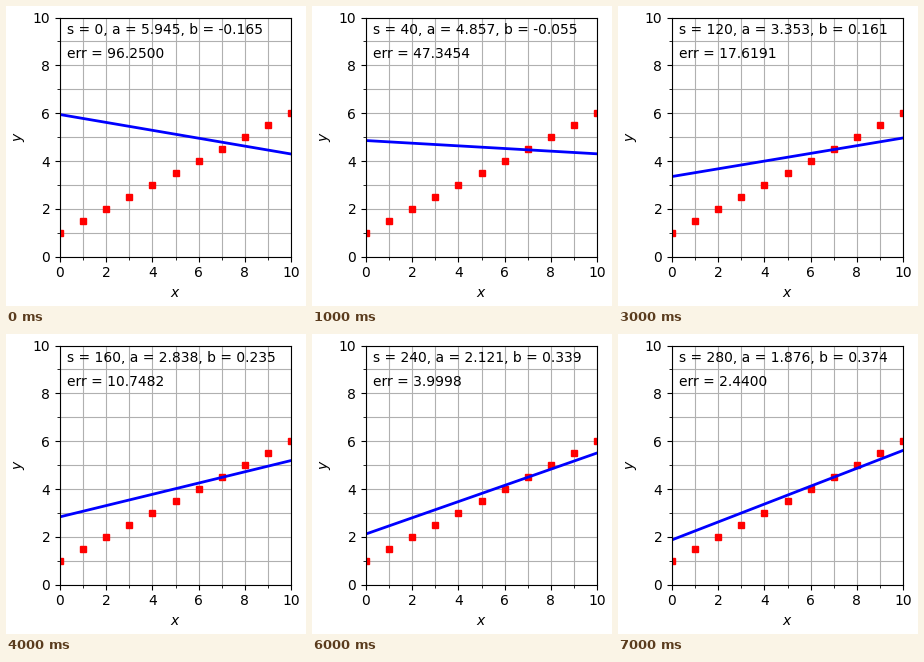
Animation, 300 px wide and 300 px high, one loop 8000 ms. Source, as a matplotlib script:

```python
import numpy as np
import matplotlib.pyplot as plt
from matplotlib.animation import FuncAnimation
from matplotlib.ticker import MultipleLocator

FRAMES = 8
STEPS_PER_FRAME = 40
RATE = 0.001

x = np.arange(11)
y = 1 + 0.5 * x


def fit(step):
    """Least-squares descent: parameters after `step`, error before it."""
    a, b = 6.0, 0.0
    for _ in range(step + 1):
        diff = a + b * x - y
        err = np.sum(diff ** 2)
        a -= 2 * RATE * np.sum(diff)
        b -= 2 * RATE * np.sum(diff * x)
    return a, b, err


plt.rcParams["font.family"] = "DejaVu Sans"
plt.rcParams["font.size"] = 10
fig, ax = plt.subplots(figsize=(3, 3), dpi=100)
fig.subplots_adjust(left=0.18, right=0.95, bottom=0.1643, top=0.9615)
ax.set(xlim=(0, 10), ylim=(0, 10), xlabel="$x$", ylabel="$y$")
for axis in (ax.xaxis, ax.yaxis):
    axis.set_major_locator(MultipleLocator(2))
    axis.set_minor_locator(MultipleLocator(1))
ax.grid(which="both")

ax.plot(x, y, "rs", markersize=4)
line, = ax.plot([], [], "b", linewidth=2)
params = ax.text(0.3, 9.3, "")
error = ax.text(0.3, 8.3, "")


def draw(frame):
    step = frame * STEPS_PER_FRAME
    a, b, err = fit(step)
    line.set_data([0, 10], [a, a + 10 * b])
    params.set_text(f"s = {step}, a = {a:.3f}, b = {b:.3f}")
    error.set_text(f"err = {err:.4f}")
    return line, params, error


anim = FuncAnimation(fig, draw, frames=FRAMES, interval=1000, repeat=True)
plt.show()
```
